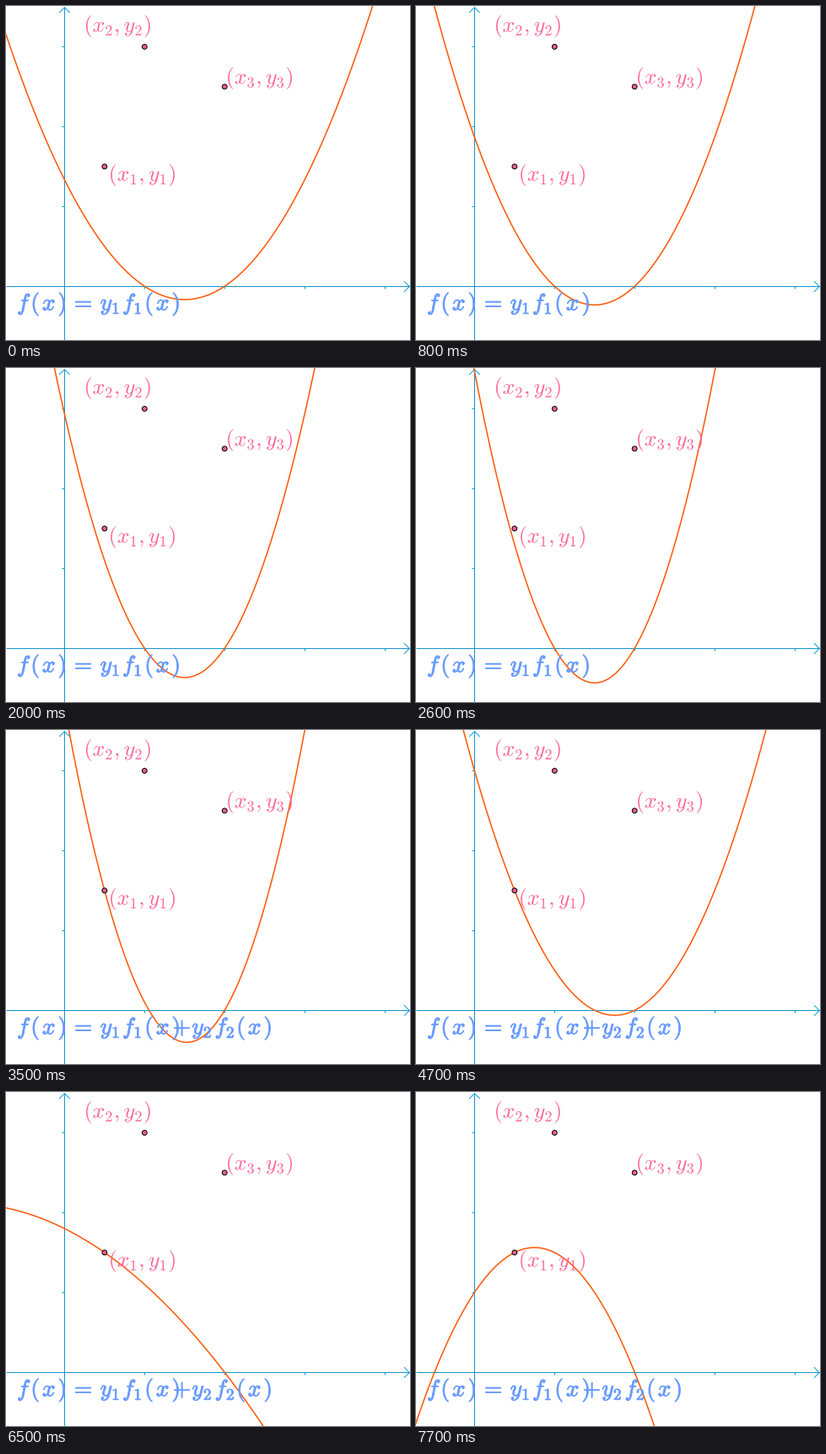
Recreate the animation shown at these times as a matplotlib script. Size 479x397 px, loop 8 s.

```python
import matplotlib.pyplot as plt
import numpy as np
from matplotlib.animation import FuncAnimation
from matplotlib.patches import Circle, PathPatch
from matplotlib.textpath import TextPath
from matplotlib.transforms import Affine2D

plt.rcParams["mathtext.fontset"] = "cm"

W, H, DPI = 479, 397, 100
PX = 72 / DPI
X0, Y0, UNIT = 69.4, 333.15, 94.9
INTERVAL, LOOP = 100, 8000
FIRST_HOLD, STEP = 500, 300

AXIS, ARROW = "#1493c8", "#0a9fe0"
CURVE, PINK, BLUE = "#ff5500", "#ff6699", "#6699ff"
POINTS = [(0.5, 1.5), (1, 3), (2, 2.5)]

fig = plt.figure(figsize=(W / DPI, H / DPI), dpi=DPI, facecolor="white")
ax = fig.add_axes([0, 0, 1, 1])
ax.set_xlim(0, W)
ax.set_ylim(H, 0)
ax.axis("off")


def to_px(x, y):
    return X0 + UNIT * x, Y0 - UNIT * y


def line(xs, ys, color, width=1.0, z=1):
    return ax.plot(xs, ys, color=color, lw=width * PX, zorder=z,
                   solid_capstyle="butt", solid_joinstyle="miter")[0]


def math_text(text, left, baseline, size, color, weight=0.0):
    """Set a math string with its ink starting at `left`."""
    path = TextPath((0, 0), f"${text}$", size=size)
    shift = left + weight / 2 - path.get_extents().x0
    path = path.transformed(Affine2D().scale(1, -1).translate(shift, baseline))
    patch = PathPatch(path, facecolor=color, edgecolor=color if weight else "none",
                      lw=weight * PX, joinstyle="round", zorder=5)
    return ax.add_patch(patch)


def bold_row(groups, baseline=361.3):
    """Set loosely spaced bold groups of space-separated tokens."""
    return [math_text(r"\hspace{0.12}".join(tokens.split()), left, baseline,
                      27.5, BLUE, 0.85)
            for tokens, left in groups]


def lagrange(i, x):
    """Basis polynomial that is 1 at point i and 0 at the others."""
    xi = POINTS[i][0]
    others = [p[0] for j, p in enumerate(POINTS) if j != i]
    return np.prod([(x - xj) / (xi - xj) for xj in others], axis=0)


# Axes with ticks and open arrow heads
line([0, W], [Y0, Y0], AXIS)
line([X0, X0], [1, H], AXIS)
line([W - 7, W - 0.7, W - 7], [Y0 - 6, Y0 + 0.3, Y0 + 6.6], ARROW)
line([X0 - 6.3, X0, X0 + 6.3], [8, 1.7, 8], ARROW)
for k in range(1, 5):
    tx, ty = to_px(k, k)
    line([tx, tx], [Y0, Y0 + 3], ARROW)
    if k < 4:
        line([X0 - 3, X0], [ty, ty], ARROW)

for point, n, left, baseline in zip(POINTS, "123", (124.2, 95, 263.2),
                                    (207.6, 30.5, 92.3)):
    ax.add_patch(Circle(to_px(*point), 2.9, facecolor="#f0608f",
                        edgecolor="black", lw=PX, zorder=4))
    math_text(f"(x_{n},y_{n})", left, baseline, 25.9, PINK)

bold_row([("f ( x )", 14), ("=", 82), (r"y_{\mathbf{1}}", 112),
          (r"f_{\mathbf{1}}", 139), ("( x )", 166.5)])
second_term = bold_row([("+", 199), (r"y_{\mathbf{2}}", 220.7),
                        (r"f_{\mathbf{2}}", 248.5), ("( x )", 275.5)])

xs = np.linspace(-0.8, 4.4, 400)
basis_1, basis_2 = lagrange(0, xs), lagrange(1, xs)
curve = line([], [], CURVE, 1.5, z=3)


def draw(frame):
    t = frame * INTERVAL
    steps = 0 if t < FIRST_HOLD else 1 + (t - FIRST_HOLD) // STEP
    tenths = 5 + steps
    y1 = min(tenths, 15) / 10
    y2 = max(tenths - 15, 0) / 10
    curve.set_data(*to_px(xs, y1 * basis_1 + y2 * basis_2))
    for patch in second_term:
        patch.set_visible(tenths >= 15)
    return [curve, *second_term]


anim = FuncAnimation(fig, draw, frames=LOOP // INTERVAL, interval=INTERVAL,
                     repeat=True, repeat_delay=0, blit=False)
plt.show()
```
